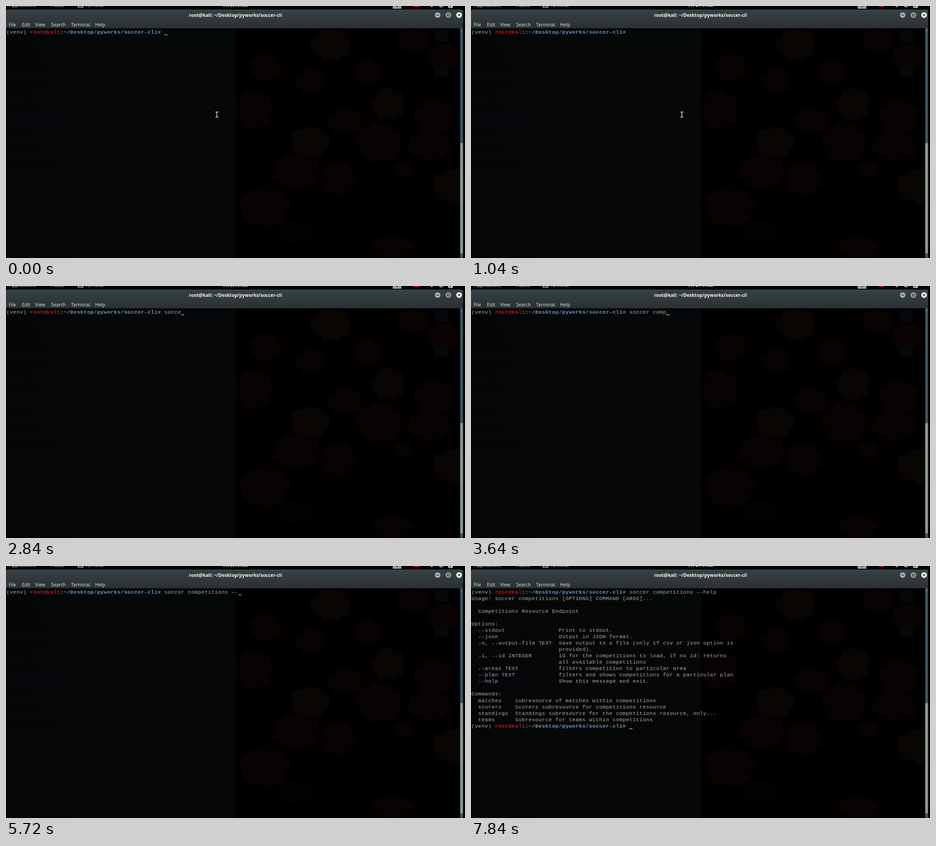
An HTML page with a canvas for the animation above (8 s loop, 1009 px wide and 555 px high).

```html
<!DOCTYPE html>
<html lang="en">
<head>
<meta charset="utf-8">
<title>Terminal</title>
<style>
html, body { margin: 0; width: 100%; height: 100%; overflow: hidden; background: #000; }
canvas { display: block; width: 1009px; height: 555px; }
</style>
</head>
<body>
<canvas id="stage" width="1009" height="555"></canvas>
<script>
const W = 1009, H = 555, LOOP = 8000;
const UI = '"Open Sans", "Noto Sans", sans-serif';
const MONO = '11.5px "Liberation Mono", monospace';
const COL = 7.385, ROW = 14.03, LEFT = 1, BASE = 61;
const TEXT = '#adafae';
const ctx = document.getElementById('stage').getContext('2d');

const COMMAND = 'soccer competitions --help';
const OUTPUT = `Usage: soccer competitions [OPTIONS] COMMAND [ARGS]...

  Competitions Resource Endpoint

Options:
  --stdout                Print to stdout.
  --json                  Output in JSON format.
  -o, --output-file TEXT  Save output to a file (only if csv or json option is
                          provided).
  -i, --id INTEGER        id for the competitions to load, if no id: returns
                          all available competitions
  --areas TEXT            filters competition to particular area
  --plan TEXT             filters and shows competitions for a particular plan
  --help                  Show this message and exit.

Commands:
  matches    subresource of matches within competitions
  scorers    Scorers subresource for competitions resource
  standings  Standings subresource for the competitions resource, only...
  teams      Subresource for teams within competitions`.split('\n');

const PROMPT = [
  ['(venv) ', TEXT, ''],
  ['root@kali', '#c0161f', 'bold '],
  [':', '#d4d6d5', ''],
  ['~/Desktop/pyworks/soccer-cli', '#6c98c8', 'bold '],
  ['# ', TEXT, '']
];
const PROMPT_LEN = PROMPT.reduce((n, part) => n + part[0].length, 0);

// Key times: an even run, then a slower finish.
const KEYS = Array.from({ length: 17 }, (_, i) => 2240 + i * 140)
  .concat([4640, 4760, 5000, 5400, 5560, 5840, 5960, 6100, 6220]);
const ENTER = 6670, PRINT = 6950, DONE = 7800, BLINK = 600, LISTED = 880;

function label(g, str, x, y, color, font, align = 'left') {
  g.font = font;
  g.fillStyle = color;
  g.textAlign = align;
  g.fillText(str, x, y);
}

function box(g, x, y, w, h, color) {
  g.fillStyle = color;
  g.fillRect(x, y, w, h);
}

function disc(g, x, y, r, color) {
  g.fillStyle = color;
  g.beginPath();
  g.arc(x, y, r, 0, Math.PI * 2);
  g.fill();
}

function path(g, color, width, points) {
  g.strokeStyle = color;
  g.lineWidth = width;
  g.beginPath();
  points.forEach(([x, y, move], i) => (i && !move ? g.lineTo(x, y) : g.moveTo(x, y)));
  g.stroke();
}

function flower(g, x, y, rx, ry, color) {
  g.fillStyle = color;
  g.beginPath();
  for (let i = 0; i <= 90; i++) {
    const a = i / 90 * Math.PI * 2;
    const k = 0.92 + 0.05 * Math.sin(a * 5 + x) + 0.05 * Math.sin(a * 9 + y) + 0.03 * Math.sin(a * 17);
    g.lineTo(x + Math.cos(a) * rx * k, y + Math.sin(a) * ry * k);
  }
  g.fill();
}

function wallpaper(g) {
  const red = '#080302', brown = '#080503';
  [
    [715, 85, 47, 38, brown], [570, 135, 37, 33, red], [670, 165, 36, 30, red],
    [795, 146, 34, 30, red], [840, 216, 40, 38, brown], [545, 228, 44, 46, red],
    [895, 76, 38, 27, red], [960, 112, 38, 34, red], [745, 254, 42, 30, red],
    [668, 300, 46, 37, brown], [820, 300, 52, 48, red], [940, 245, 46, 42, red],
    [930, 308, 52, 34, red], [640, 365, 54, 42, red], [730, 382, 42, 38, red],
    [872, 360, 24, 17, red], [982, 396, 48, 40, brown], [568, 442, 58, 48, red],
    [850, 530, 46, 26, red], [640, 498, 40, 30, '#010301']
  ].forEach(f => flower(g, ...f));
  for (const y of [53, 130]) {
    box(g, 942, y, 30, 25, '#05070a');
    box(g, 936, y + 36, 44, 3, '#050506');
  }
}

function fileWindow(g) {
  box(g, 0, 49, 505, 506, '#060806');
  box(g, 0, 49, 138, 506, '#050707');
  box(g, 138, 60, 367, 16, '#03080a');
  box(g, 0, 237, 138, 24, '#04060a');
  const places = ['Home', 'Desktop', 'Documents', 'Downloads', 'Music', 'Pictures'];
  const rows = places.map((name, i) => [name, 83 + i * 28])
    .concat([['Trash', 279], ['Network', 314], ['Other Locations', 348]]);
  for (const [name, y] of rows) {
    box(g, 13, y - 4, 8, 8, '#020303');
    label(g, name, 28, y + 4, '#010202', '10px ' + UI);
  }
}

function topPanel(g) {
  box(g, 0, 0, W, 9, '#030404');
  const ink = '#d4d6d5', bold = 'bold 10.1px ' + UI, plain = '10.1px ' + UI;
  label(g, 'Applications', 8, 2, ink, plain);
  label(g, 'Places', 99, 2, ink, plain);
  label(g, 'Terminal', 174, 2, ink, plain);
  label(g, 'Fri 6:14 AM', 505, 2, ink, bold, 'center');
  path(g, ink, 1.5, [[158.7, 0], [158.7, 2.4], [169.3, 2.4], [169.3, 0]]);
  box(g, 850, 0, 19, 6, '#9a9d9e');
  box(g, 858, 0, 4, 2, '#3a3d3e');
  box(g, 897, 0, 10, 2, '#c3101a');
  box(g, 906, 1, 2, 2, '#c3101a');
  path(g, ink, 1.3, [[933.5, 0], [936, 2], [938.5, 0]]);
  path(g, ink, 1.3, [[952, 1], [955, 1], [957, 3], [957, 0], [960, 2, 1], [962, 0]]);
  box(g, 972, 0, 10, 4, ink);
  box(g, 974, 0, 4, 2, '#3a3d3e');
}

function frame(g) {
  const fill = g.createLinearGradient(0, 8, 0, 49);
  fill.addColorStop(0, '#374044');
  fill.addColorStop(1, '#293134');
  g.fillStyle = fill;
  g.beginPath();
  g.roundRect(0, 8, 1005, 41, [4, 4, 0, 0]);
  g.fill();
  box(g, 3, 8, 999, 1, '#465055');
  label(g, 'root@kali: ~/Desktop/pyworks/soccer-cli', 504.5, 23.5, '#f3f5f4', 'bold 10.13px ' + UI, 'center');
  [['File', 6], ['Edit', 35], ['View', 64], ['Search', 99], ['Terminal', 143], ['Help', 196]]
    .forEach(([name, x]) => label(g, name, x, 44.5, '#e6e9e8', '10.3px ' + UI));

  disc(g, 949, 20, 6, '#a9b1b4');
  path(g, '#2d3437', 1.6, [[946, 20], [952, 20]]);
  disc(g, 972.5, 20, 6, '#a9b1b4');
  g.strokeRect(970.3, 17.8, 4.4, 4.4);
  disc(g, 996, 20, 6.2, '#f2f4f3');
  path(g, '#2d3437', 1.5, [[993.7, 17.7], [998.3, 22.3], [998.3, 17.7, 1], [993.7, 22.3]]);

  box(g, 998.5, 49, 6, 506, '#3f565f');
  box(g, 998.5, 302, 6, 243, '#8d9896');
  path(g, '#8d9896', 1, [[1000, 56], [1001.5, 53.5], [1003, 56]]);
}

function still(listed) {
  const c = document.createElement('canvas');
  c.width = W;
  c.height = H;
  const g = c.getContext('2d');
  box(g, 0, 0, W, H, '#000');
  wallpaper(g);
  fileWindow(g);
  if (listed) {
    const dim = '#010202', font = '10px ' + UI;
    label(g, 'Screencast 11-02 at 15.14.24 PM.webm', 165, 89, dim, font);
    label(g, '1.4 MB', 384, 89, dim, font);
    label(g, '6:14 AM', 460, 89, dim, font);
  }
  topPanel(g);
  frame(g);
  return c;
}

const colX = n => LEFT + n * COL;
const rowY = n => Math.round(BASE + n * ROW);

function prompt(row) {
  let col = 0;
  for (const [str, color, weight] of PROMPT) {
    label(ctx, str, colX(col), rowY(row), color, weight + MONO);
    col += str.length;
  }
}

function cursorOn(t) {
  if (t < KEYS[0]) return Math.floor((t + 100) / BLINK) % 2 === 0;
  const last = t >= ENTER ? ENTER : KEYS.filter(k => k <= t).pop();
  return Math.floor((t - last + (t >= DONE ? 30 : 0)) / BLINK) % 2 === 0;
}

function pointer() {
  const beam = [[460.5, 233.5], [466.5, 233.5], [463.5, 233.5, 1], [463.5, 244.5], [460.5, 244.5, 1], [466.5, 244.5]];
  path(ctx, '#000', 3, beam);
  path(ctx, '#e6e8e7', 1.4, beam);
}

const empty = still(false), filled = still(true);

// Terminal cells are a little wider than the glyphs.
ctx.font = MONO;
ctx.letterSpacing = (COL - ctx.measureText('m').width) + 'px';

function draw(t) {
  ctx.drawImage(t < LISTED ? empty : filled, 0, 0);
  const typed = KEYS.filter(k => k <= t).length;
  prompt(0);
  label(ctx, COMMAND.slice(0, typed), colX(PROMPT_LEN), rowY(0), TEXT, MONO);

  let row = 0, col = PROMPT_LEN + typed;
  if (t >= ENTER) {
    row = 1;
    col = 0;
  }
  if (t >= PRINT) {
    OUTPUT.forEach((line, i) => label(ctx, line, LEFT, rowY(i + 1), TEXT, MONO));
    row = OUTPUT.length + 1;
  }
  if (t >= DONE) {
    prompt(row);
    col = PROMPT_LEN;
  }
  if (cursorOn(t)) box(ctx, Math.round(colX(col)), rowY(row) + 2, 7, 1, '#e8eae9');
  if (t < KEYS[0]) pointer();
}

const start = performance.now();
function tick() {
  draw((performance.now() - start) % LOOP);
  requestAnimationFrame(tick);
}
tick();
</script>
</body>
</html>
```
